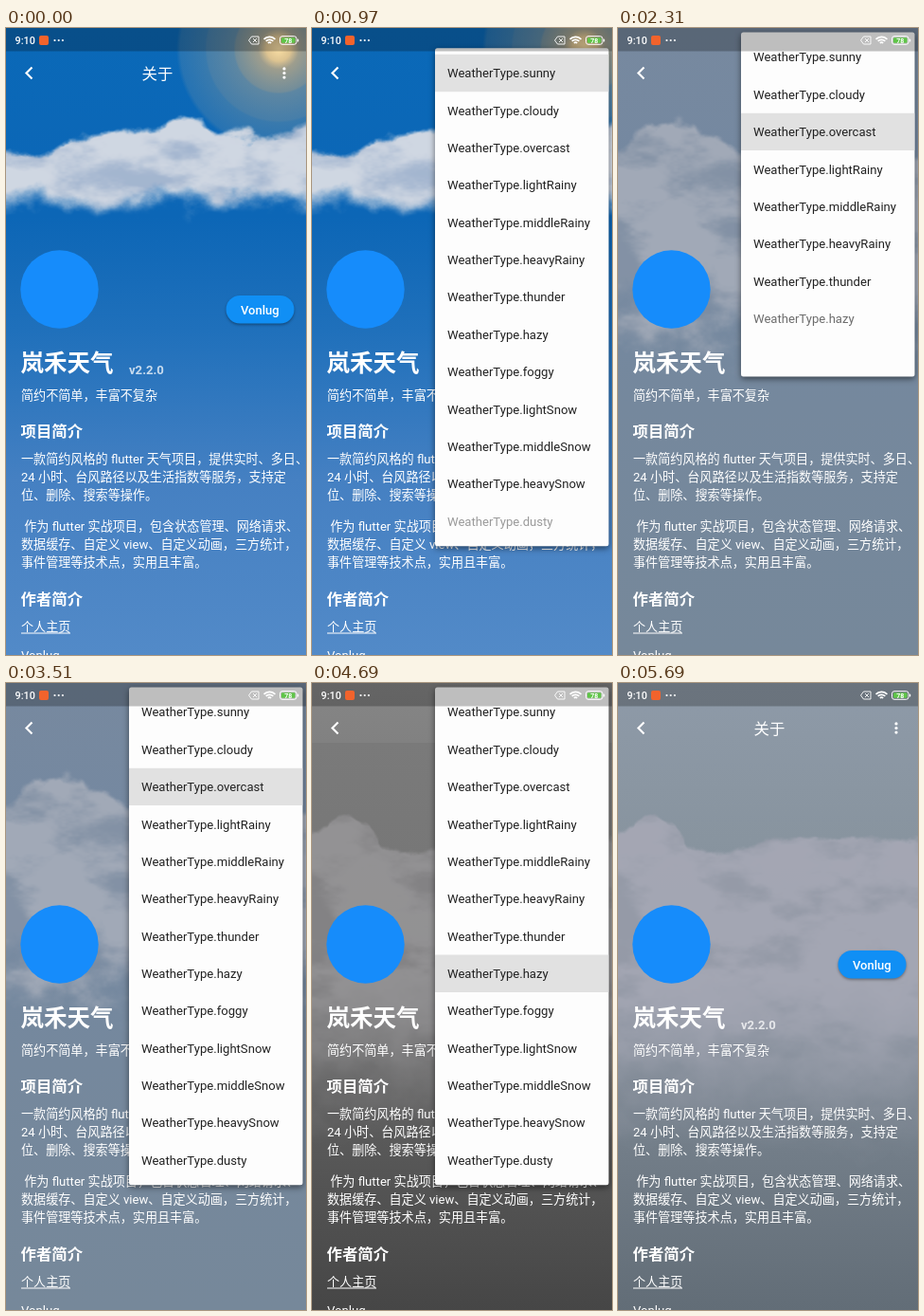
Recreate the animation shown at these times as an HTML page with a canvas. Size 317x661 px, loop 6.2 s.

```html
<!DOCTYPE html>
<html lang="zh-CN">
<head>
<meta charset="utf-8">
<title>关于</title>
<style>
html, body { margin: 0; width: 100%; height: 100%; overflow: hidden; background: #0a62ae; }
canvas { display: block; width: 317px; height: 661px; }
</style>
</head>
<body>
<canvas id="stage"></canvas>
<script>
const W = 317, H = 661, LOOP = 6200;
const FONT = 'Roboto, "Noto Sans CJK SC", "Noto Sans CJK", sans-serif';
const canvas = document.getElementById('stage');
const dpr = window.devicePixelRatio || 1;
canvas.width = W * dpr;
canvas.height = H * dpr;
const g = canvas.getContext('2d');

const clamp = (v, a = 0, b = 1) => Math.min(b, Math.max(a, v));
const lerp = (a, b, t) => a + (b - a) * t;
const span = (a, b, v) => clamp((v - a) / (b - a));
const smooth = (a, b, v) => { const t = span(a, b, v); return t * t * (3 - 2 * t); };

// Seeded value noise
function hash(x, y) {
  let h = Math.imul(x, 374761393) + Math.imul(y, 668265263);
  h = Math.imul(h ^ (h >>> 13), 1274126177);
  return ((h ^ (h >>> 16)) >>> 0) / 4294967296;
}
function noise(x, y) {
  const xi = Math.floor(x), yi = Math.floor(y);
  const u = smooth(0, 1, x - xi), v = smooth(0, 1, y - yi);
  return lerp(lerp(hash(xi, yi), hash(xi + 1, yi), u),
              lerp(hash(xi, yi + 1), hash(xi + 1, yi + 1), u), v);
}
function fbm(x, y) {
  let sum = 0, amp = 0.5;
  for (let i = 0; i < 5; i++) {
    sum += amp * noise(x, y);
    x = x * 2 + 17; y = y * 2 + 31; amp /= 2;
  }
  return sum / 0.97;
}
function along(pts, x) {
  let i = 1;
  while (i < pts.length - 1 && pts[i][0] < x) i++;
  const [x0, y0] = pts[i - 1], [x1, y1] = pts[i];
  return lerp(y0, y1, smooth(x0, x1, x));
}

const ridge = [[0, 150], [35, 132], [56, 146], [75, 166], [130, 170], [205, 160], [245, 163], [317, 164]];
const scenes = {
  sunny: {
    sky: [[0, '#0a69b8'], [0.3, '#0c66b6'], [0.48, '#1f70bb'], [0.72, '#4580c2'], [1, '#528ac8']],
    edge: [[0, 122], [40, 125], [70, 106], [105, 99], [150, 100], [190, 90], [225, 103], [270, 110], [317, 97]],
    low: [168, 198], soft: 9, rough: 30, lowRough: 40,
    light: [213, 218, 227], dark: [168, 184, 208], alpha: 0.97, sun: true
  },
  overcast: {
    sky: [[0, '#77899f'], [0.3, '#7488a1'], [0.6, '#75889d'], [1, '#76889a']],
    edge: [[0, 122], [30, 98], [62, 90], [95, 102], [132, 124], [190, 125], [250, 140], [317, 135]],
    low: [265, 345], soft: 9, rough: 28, lowRough: 110,
    light: [165, 172, 185], dark: [132, 146, 165], alpha: 0.92
  },
  hazy: {
    sky: [[0, '#868686'], [0.095, '#818181'], [0.096, '#7a7a7a'], [0.4, '#757575'], [0.7, '#5b5b5b'], [1, '#464646']],
    edge: ridge, low: [290, 500], soft: 6, rough: 26, lowRough: 60,
    light: [149, 148, 150], dark: [132, 131, 133], alpha: 0.92
  },
  foggy: {
    sky: [[0, '#8e9aa8'], [0.25, '#88949f'], [0.5, '#828d99'], [1, '#626d77']],
    edge: ridge, low: [300, 510], soft: 6, rough: 26, lowRough: 60,
    light: [166, 168, 181], dark: [150, 155, 168], alpha: 0.92
  }
};

function paintSun(k) {
  const glow = k.createRadialGradient(288, 22, 0, 288, 22, 108);
  [[0, '255,226,165', 0.98], [0.12, '250,208,140', 0.88], [0.2, '215,178,125', 0.72],
   [0.42, '190,168,132', 0.58], [0.44, '175,165,142', 0.5], [0.7, '160,160,148', 0.4],
   [0.72, '155,160,152', 0.32], [0.96, '150,160,160', 0.2], [1, '150,160,160', 0]]
    .forEach(([p, rgb, a]) => glow.addColorStop(p, `rgba(${rgb},${a})`));
  k.fillStyle = glow;
  k.fillRect(0, 0, W, 140);
}

function paintScene(s) {
  const c = document.createElement('canvas');
  c.width = W; c.height = H;
  const k = c.getContext('2d');
  const sky = k.createLinearGradient(0, 0, 0, H);
  s.sky.forEach(([p, col]) => sky.addColorStop(p, col));
  k.fillStyle = sky;
  k.fillRect(0, 0, W, H);
  if (s.sun) paintSun(k);
  const img = k.getImageData(0, 0, W, H), d = img.data;
  for (let x = 0; x < W; x++) {
    const edge = along(s.edge, x);
    for (let y = 60; y < 600; y++) {
      const n = fbm(x / 32, y / 26) - 0.5;
      const a = s.alpha * smooth(0, s.soft, y - edge + n * s.rough)
        * (1 - smooth(s.low[0], s.low[1], y + n * s.lowRough));
      if (a <= 0) continue;
      const shade = smooth(0.22, 0.52, fbm(x / 60 + 9, y / 32 + 5));
      const p = (y * W + x) * 4;
      for (let i = 0; i < 3; i++) {
        d[p + i] = lerp(d[p + i], lerp(s.dark[i], s.light[i], shade), a);
      }
    }
  }
  k.putImageData(img, 0, 0);
  return c;
}
const skies = {};
for (const name in scenes) skies[name] = paintScene(scenes[name]);

function text(str, x, cy, size, { weight = 400, color = '#fff', align = 'left' } = {}) {
  g.font = `${weight} ${size}px ${FONT}`;
  g.fillStyle = color;
  g.textAlign = align;
  g.fillText(str, x, cy + size * 0.37);
}
function box(x, y, w, h, r, color) {
  g.beginPath();
  g.roundRect(x, y, w, h, r);
  g.fillStyle = color;
  g.fill();
}
function disc(x, y, r, color) {
  g.beginPath();
  g.arc(x, y, r, 0, Math.PI * 2);
  g.fillStyle = color;
  g.fill();
}
function line(pts, width) {
  g.beginPath();
  pts.forEach(([x, y]) => g.lineTo(x, y));
  g.lineWidth = width;
  g.strokeStyle = '#fff';
  g.stroke();
}
function shadow(color, blur, dy) {
  g.shadowColor = color;
  g.shadowBlur = blur * dpr;
  g.shadowOffsetY = dy * dpr;
}

const body = [
  [16, 387, '简约不简单，丰富不复杂'],
  [16, 454.3, '一款简约风格的 flutter 天气项目，提供实时、多日、'],
  [16, 473, '24 小时、台风路径以及生活指数等服务，支持定'],
  [16, 491.7, '位、删除、搜索等操作。'],
  [16, 525.6, ' 作为 flutter 实战项目，包含状态管理、网络请求、'],
  [16, 544.4, '数据缓存、自定义 view、自定义动画，三方统计，'],
  [16, 563, '事件管理等技术点，实用且丰富。'],
  [16, 631.5, '个人主页'],
  [16, 661, 'Vonlug']
];

function drawPage() {
  line([[27.5, 41.5], [21.5, 47.5], [27.5, 53.5]], 2.2);
  text('关于', 160, 48, 16.4, { align: 'center' });
  for (let i = -1; i <= 1; i++) disc(294, 47.5 + i * 4.6, 1.6, '#fff');

  disc(56.5, 275.5, 41.2, '#168cfb');

  g.save();
  shadow('rgba(0,0,0,0.35)', 3, 1.5);
  box(232.5, 282, 72, 29.5, 14.75, '#108ff5');
  g.restore();
  text('Vonlug', 268.3, 296.7, 13, { weight: 500, align: 'center' });

  text('岚禾天气', 15.5, 352.5, 24.5, { weight: 700 });
  text('v2.2.0', 130, 360, 13.1, { weight: 700, color: 'rgba(255,255,255,0.75)' });
  text('项目简介', 15.5, 424.5, 16.4, { weight: 700 });
  text('作者简介', 15.5, 601.5, 16.4, { weight: 700 });
  body.forEach(([x, y, str]) => text(str, x, y, 13.1));
  g.fillRect(16, 637.5, 52, 1);
}

function drawStatusBar() {
  g.fillStyle = 'rgba(0,0,0,0.25)';
  g.fillRect(0, 0, W, 24.5);
  text('9:10', 9.5, 13, 10.8, { weight: 500 });
  box(35, 8, 10, 10, 2, '#f2632c');
  for (let i = 0; i < 3; i++) disc(51.5 + i * 4.2, 13, 1.1, '#fff');

  g.beginPath();
  g.moveTo(256.5, 13);
  [[259.5, 9], [267, 9], [267, 17], [259.5, 17]].forEach(p => g.lineTo(...p));
  g.closePath();
  g.lineWidth = 0.9;
  g.strokeStyle = '#fff';
  g.stroke();
  line([[261, 11], [265, 15]], 0.9);
  line([[265, 11], [261, 15]], 0.9);

  for (const r of [2.2, 5.2, 8.2]) {
    g.beginPath();
    g.arc(278.5, 17.5, r, -Math.PI * 0.76, -Math.PI * 0.24);
    g.lineWidth = 1.7;
    g.stroke();
  }

  g.beginPath();
  g.roundRect(289.5, 8.7, 17.5, 8.6, 2.5);
  g.lineWidth = 1;
  g.stroke();
  box(291, 10.2, 14.5, 5.6, 1, '#5fc548');
  box(308, 11.5, 1.2, 3, 0.5, '#fff');
  text('78', 298.2, 13, 7, { weight: 700, align: 'center' });
}

const types = ['sunny', 'cloudy', 'overcast', 'lightRainy', 'middleRainy', 'heavyRainy', 'thunder',
  'hazy', 'foggy', 'lightSnow', 'middleSnow', 'heavySnow', 'dusty'];
const ROW = 39.37, PAD = 6.56, MENU_W = 183.5, RIGHT = 313.5;
const UNIT = 1 / (types.length + 1.5);
const menus = [
  { open: 688, close: 1412, end: 1690, top: 21.2, picked: 0, tap: 2 },
  { open: 2125, close: 3690, end: 3980, top: 4.4, picked: 2, tap: 7 },
  { open: 4385, close: 5385, end: 5685, top: 4.4, picked: 7, tap: 8 }
];

function drawMenu(m, now) {
  const p = now < m.close ? span(0, 300, now - m.open)
    : clamp((1 - (now - m.close) / 300) * 1.5);
  const w = MENU_W * span(0, UNIT, p);
  const h = (PAD * 2 + ROW * types.length) * span(0, UNIT * types.length, p);
  const fade = span(0, 1 / 3, p);
  if (fade === 0) return;
  g.save();
  g.globalAlpha = fade;
  g.save();
  shadow('rgba(0,0,0,0.5)', 6, 2.5);
  box(RIGHT - w, m.top, w, h, 2.5, '#fdfdfd');
  g.restore();
  g.clip();
  const ripple = span(m.close - 140, m.close, now);
  const rippleInk = 0.08 * (1 - span(m.close, m.close + 150, now));
  types.forEach((type, i) => {
    const start = (i + 1) * UNIT;
    const y = m.top + PAD + i * ROW;
    g.globalAlpha = fade * span(start, Math.min(1, start + 1.5 * UNIT), p);
    if (i === m.picked) box(130, y, MENU_W, ROW, 0, '#e1e1e1');
    if (i === m.tap && ripple > 0) {
      g.save();
      g.beginPath();
      g.rect(130, y, MENU_W, ROW);
      g.clip();
      disc(215, y + ROW / 2, 110 * ripple, `rgba(0,0,0,${rippleInk})`);
      g.restore();
    }
    text('WeatherType.' + type, 143, y + ROW / 2 - 0.1, 13.1, { color: '#212121' });
  });
  g.restore();
}

function draw(now) {
  g.setTransform(dpr, 0, 0, dpr, 0, 0);
  g.drawImage(skies.sunny, 0, 0);
  for (const m of menus) {
    const a = span(m.close, m.close + 190, now);
    if (a === 0) break;
    g.globalAlpha = a;
    g.drawImage(skies[types[m.tap]], 0, 0);
  }
  g.globalAlpha = 1;
  drawPage();
  const menu = menus.find(m => now >= m.open && now < m.end);
  if (menu) drawMenu(menu, now);
  drawStatusBar();
}

const begin = performance.now();
function frame() {
  draw((performance.now() - begin) % LOOP);
  requestAnimationFrame(frame);
}
frame();
</script>
</body>
</html>
```
